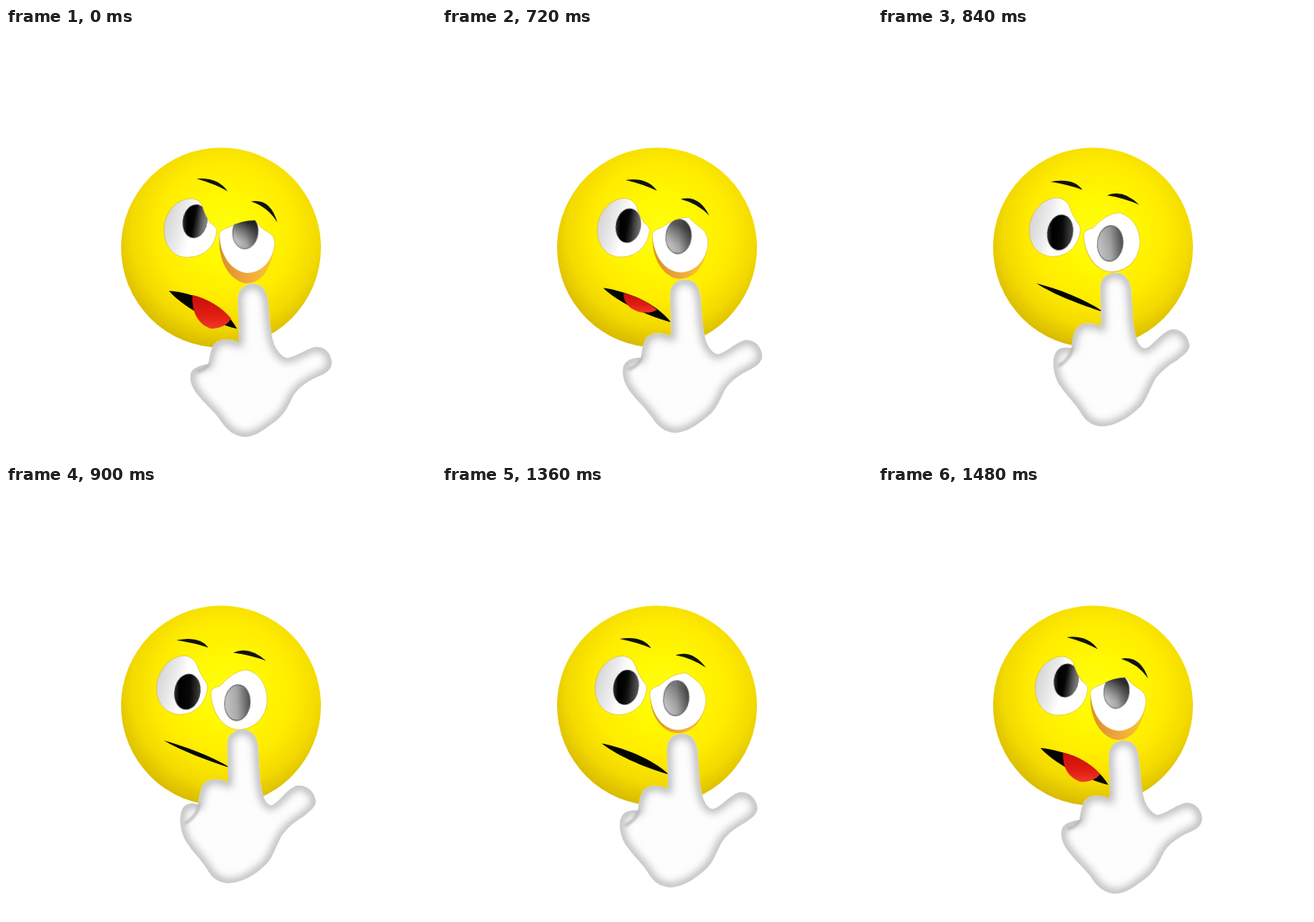
Recreate the animation shown at these times as an HTML page without scripts. Size 512 by 512 pixels, loop 1.54 s.

```html
<!DOCTYPE html>
<html lang="en">
<head>
<meta charset="utf-8">
<title>Smiley pulling down an eyelid</title>
<style>
html, body { margin: 0; width: 100%; height: 100%; overflow: hidden; background: #fff; }
svg { display: block; width: 100vw; height: 100vh; }

/* Every moving part blends from its pulled pose (0) to its relaxed pose (1). */
.m { animation: pose 1540ms infinite; }

@keyframes pose {
  0%, 42.85% {
    d: var(--d0, none); transform: var(--t0, none); opacity: var(--o0, 1);
    animation-timing-function: linear(.104 0% 20%, .352 20% 40%, .648 40% 60%, .896 60% 80%, 1 80% 100%);
  }
  62.33%, 84.41% {
    d: var(--d1, none); transform: var(--t1, none); opacity: var(--o1, 1);
    animation-timing-function: linear(.104 0% 25%, .352 25% 50%, .648 50% 75%, .896 75% 100%);
  }
  100% { d: var(--d0, none); transform: var(--t0, none); opacity: var(--o0, 1); }
}

.lick { animation: lick 1540ms step-end infinite; }
@keyframes lick {
  0% { opacity: 1; }
  50.64% { opacity: 0; }
  92.2%, 100% { opacity: 1; }
}

.brow-l {
  --d0: path("M227,179.5 Q252,177 264,194.5 Q250,186 227,179.5Z");
  --d1: path("M203,183.5 Q231,178 241,192.5 Q225,187 203,183.5Z");
}
.brow-r {
  --d0: path("M291.5,206.5 Q315,202.5 323,231.5 Q312,213 291.5,206.5Z");
  --d1: path("M270.5,198.5 Q289,190 309.5,208 Q290,201 270.5,198.5Z");
}
.eye-l {
  --d0: path("M188,240 C188,220 203,203 221,203 Q229,204 233,210 Q236,222 243,232 Q250,236 251,240 C250,258 238,273 215,273 C198,273 188,258 188,240Z");
  --d1: path("M179,240 C180,220 195,202 213,202 Q222,203 227,212 Q230,222 237,232 Q240,236 240,240 C238,258 226,272 207,272 C189,271 179,258 179,240Z");
}
.eye-r {
  --d0: path("M254,245 Q256,240 266,237 Q280,229 297,229 Q302,238 312,243 Q320,247 320,256 C319,276 305,292 287,292 C268,290 254,270 254,245Z");
  --d1: path("M244,245 Q246,240 255,238 Q272,219 287,219 Q298,222 304,231 Q311,242 311,255 C310,276 295,290 277,290 C258,290 244,268 244,245Z");
}
.lid {
  --d0: path("M254,248 C252,282 270,303 287,304 C303,303 315,290 319,262Z");
  --d1: path("M245,250 C245,270 259,289 277,289 C296,289 309,274 310,258Z");
}
.pupil-l {
  --t0: translate(225px, 230px) rotate(10deg) scale(14.5, 20);
  --t1: translate(216px, 245px) rotate(10deg) scale(15.5, 21.5);
}
.pupil-r {
  --t0: translate(285px, 243px) rotate(5deg) scale(15, 20);
  --t1: translate(275.5px, 258px) rotate(5deg) scale(15.2, 21.3);
}
.fade { --o1: 0; }
.mouth {
  --d0: path("M194,313 C224,315 260,330 275,358 C258,355 215,337 194,313Z");
  --d1: path("M188,303 C212,310 244,321 268,336 C240,327 208,315 188,303Z");
}
.tongue {
  --d0: path("M222,318 C240,322 258,333 268,346 C264,354 254,358 244,358 C230,353 221,341 222,318Z");
  --d1: path("M205,311 C218,315 224,316 234,316 C222,312 225,305 220,302 C215,302 208,308 205,311Z");
}
.hand {
  --d0: path("M277,374 C278,355 276,335 276,322 C277,311 284,304.5 294,304.5 C304,304.5 310,311 312,325 C314,342 314,360 319,376 C323,385 329,392 335,393 C346,391 356,383 367,380 C378,378 387,386 388,398 C388,406 382,411 374,414 C360,420 349,427 342,438 C336,450 332,460 320,469 C308,477 298,487 284,487 C272,486 264,479 258,471 C248,456 238,449 231,440 C222,430 218,421 220,411 C223,404 231,402 241,400 C243,390 243,384 248,376 C256,369 266,370 277,374Z");
  --d1: path("M264,353 C265,335 263,318 263.5,306 C264,296 272,290 282,290 C292,290 298,297 300,309 C302,328 301,350 306,367 C308,376 313,381 317,380 C326,376 332,363 345,357 C356,354 368,363 369,376 C368,384 361,387 355,393 C343,400 334,408 328,417 C320,432 317,445 308,452 C297,463 280,473 264,473 C253,472 246,467 241,459 C233,445 224,438 217,427 C209,418 206,400 208,391 C210,380 216,376 229,379 C230,370 231,362 235,355 C243,347 253,348 264,353Z");
}
.fold {
  --d0: path("M242,398 Q239,407 227,409");
  --d1: path("M230,378 Q229,392 213,402");
}
.rim { stroke: #c89a00; stroke-opacity: .4; stroke-width: 1; }
</style>
</head>
<body>
<svg viewBox="0 0 512 512">
  <defs>
    <radialGradient id="skin" gradientUnits="userSpaceOnUse" cx="261" cy="243" r="140">
      <stop offset="0" stop-color="#fffe10"/>
      <stop offset=".3" stop-color="#fff800"/>
      <stop offset=".58" stop-color="#ffec00"/>
      <stop offset=".8" stop-color="#f3da00"/>
      <stop offset="1" stop-color="#d6b800"/>
    </radialGradient>
    <linearGradient id="ball" x1="0" y1=".3" x2="1" y2=".6">
      <stop offset="0" stop-color="#d2d2d2"/>
      <stop offset=".35" stop-color="#ececec"/>
      <stop offset=".55" stop-color="#fff"/>
    </linearGradient>
    <linearGradient id="under" x1="0" y1="0" x2="1" y2="0">
      <stop offset="0" stop-color="#d98f28"/>
      <stop offset=".5" stop-color="#f0a63c"/>
      <stop offset="1" stop-color="#ffc82a"/>
    </linearGradient>
    <linearGradient id="dark" x1="0" y1=".6" x2="1" y2=".4">
      <stop offset="0" stop-color="#333"/>
      <stop offset=".2" stop-color="#000"/>
      <stop offset=".6" stop-color="#080808"/>
      <stop offset="1" stop-color="#444"/>
    </linearGradient>
    <linearGradient id="shine" x1="0" y1="0" x2="1" y2="0">
      <stop offset=".45" stop-color="#888" stop-opacity="0"/>
      <stop offset="1" stop-color="#888"/>
    </linearGradient>
    <linearGradient id="grey" x1="0" y1=".6" x2="1" y2=".4">
      <stop offset="0" stop-color="#c8c8c8"/>
      <stop offset=".5" stop-color="#a6a6a6"/>
      <stop offset="1" stop-color="#4c4c4c"/>
    </linearGradient>
    <linearGradient id="shade" x1=".6" y1=".1" x2=".4" y2="1">
      <stop offset=".1" stop-color="#222"/>
      <stop offset=".8" stop-color="#555" stop-opacity="0"/>
    </linearGradient>
    <linearGradient id="red" x1="0" y1="0" x2="0" y2="1">
      <stop offset="0" stop-color="#c80f08"/>
      <stop offset=".6" stop-color="#e01c10"/>
      <stop offset="1" stop-color="#ee3a28"/>
    </linearGradient>
    <filter id="soft" x="-20%" y="-20%" width="140%" height="140%"><feGaussianBlur stdDeviation="5"/></filter>
    <filter id="blur" x="-50%" y="-50%" width="200%" height="200%"><feGaussianBlur stdDeviation="1.6"/></filter>
    <clipPath id="in-l"><path class="m eye-l"/></clipPath>
    <clipPath id="in-r"><path class="m eye-r"/></clipPath>
    <clipPath id="in-hand"><path class="m hand"/></clipPath>
  </defs>

  <rect width="512" height="512" fill="#fff"/>
  <circle cx="256" cy="261.5" r="119" fill="url(#skin)"/>

  <path class="m brow-l" fill="#111"/>
  <path class="m brow-r" fill="#111"/>

  <path class="m eye-l rim" fill="url(#ball)"/>
  <g clip-path="url(#in-l)">
    <ellipse class="m pupil-l" rx="1" ry="1" fill="url(#dark)"/>
    <ellipse class="m pupil-l fade" rx="1" ry="1" fill="url(#shine)"/>
  </g>

  <path class="m lid" fill="url(#under)"/>
  <path class="m eye-r rim" fill="#fff"/>
  <g clip-path="url(#in-r)">
    <ellipse class="m pupil-r" rx="1" ry="1" fill="url(#grey)" stroke="#555" stroke-width=".05"/>
    <ellipse class="m pupil-r fade" rx="1" ry="1" fill="url(#shade)"/>
  </g>

  <path class="m mouth" fill="#050500"/>
  <g class="lick"><path class="m tongue" fill="url(#red)"/></g>

  <path class="m hand" fill="#fdfdfd"/>
  <g clip-path="url(#in-hand)" fill="none">
    <path class="m hand" stroke="#b8b8b8" stroke-width="10" filter="url(#soft)"/>
    <path class="m fold" stroke="#b0b0b0" stroke-width="3" filter="url(#blur)"/>
  </g>
</svg>
</body>
</html>
```
